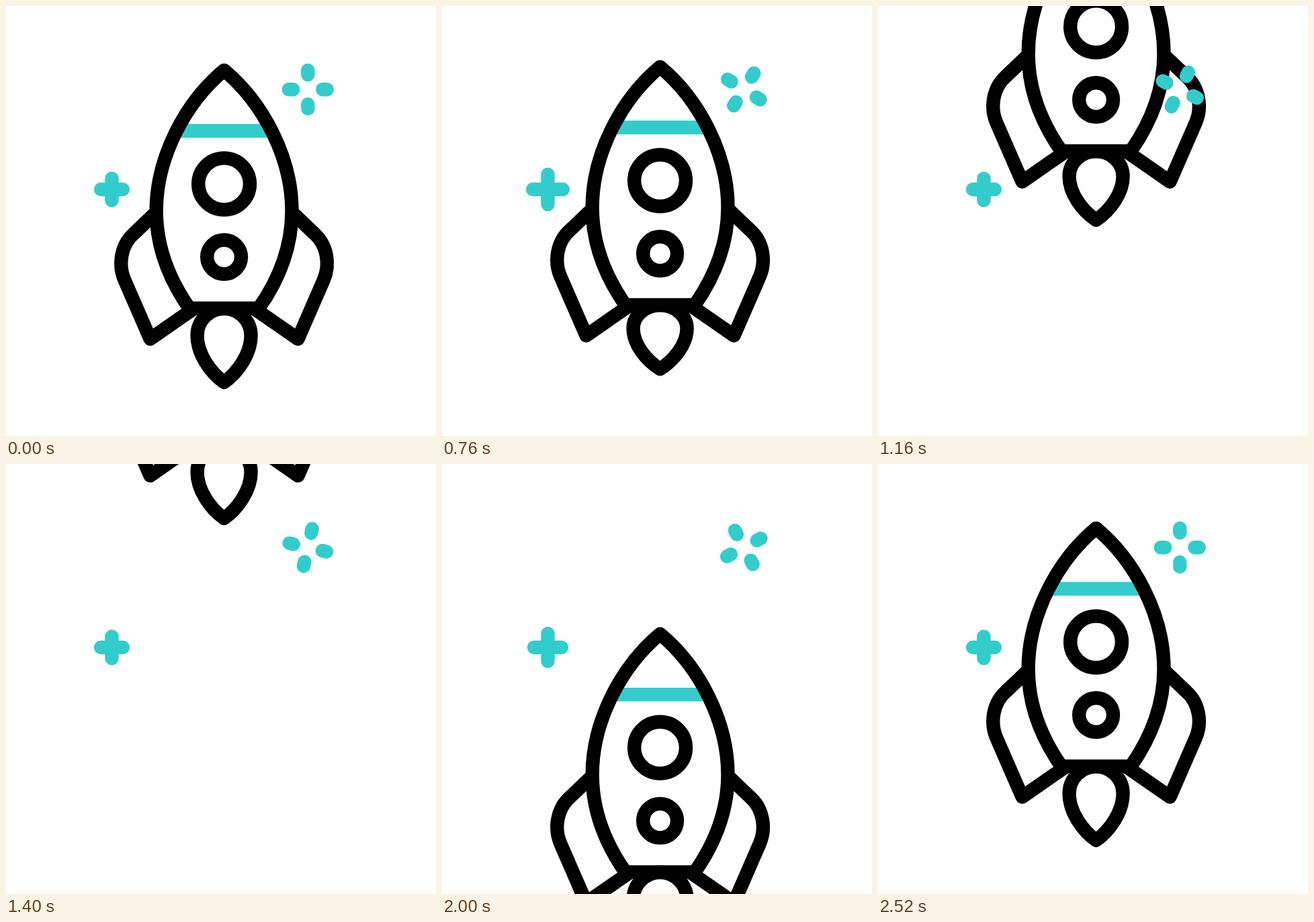
An HTML page for the animation above (2760 ms loop, 640 px wide and 640 px high).

```html
<!DOCTYPE html>
<html lang="en">
<head>
<meta charset="utf-8">
<title>Rocket launch</title>
<style>
  html, body { margin: 0; width: 100%; height: 100%; overflow: hidden; background: #fff; }
  svg { display: block; width: 100%; height: 100%; }
  .ink, .teal { fill: none; stroke-width: 20.4; stroke-linejoin: round; stroke-linecap: round; }
  .ink { stroke: #000; }
  .teal { stroke: #33cccc; }
</style>
</head>
<body>
<svg viewBox="0 0 640 640">
  <g id="rocket">
    <path class="teal" style="stroke-linecap:butt" d="M256 185.7H393"/>
    <g class="ink">
      <path d="M273 450C240 403 223.7 355 223.7 305C223.7 225 267 143.5 324.6 95.6C382.2 143.5 425.5 225 425.5 305C425.5 355 409.2 403 376.2 450Z"/>
      <path id="fin" d="M222 308.5L190 339C171 356 166.5 385 176.5 408L214.6 495.5L278 451.5"/>
      <use href="#fin" transform="matrix(-1 0 0 1 649.2 0)"/>
      <circle cx="324.6" cy="264.8" r="38.4"/>
      <circle cx="324.6" cy="373.6" r="25.4"/>
      <path id="flame"/>
    </g>
  </g>
  <path id="plus" class="teal"/>
  <path id="spark" class="teal" d="M0-28.5V-22M28.5 0H22M0 28.5V22M-28.5 0H-22"/>
</svg>
<script>
const LOOP = 2760, STEP = 40;
const el = id => document.getElementById(id);
const rocket = el('rocket'), flame = el('flame'), plus = el('plus'), spark = el('spark');

const span = (t, a, b) => Math.min(1, Math.max(0, (t - a) / (b - a)));
const smooth = p => p * p * (3 - 2 * p);
const pulse = (t, a, peak, b) => smooth(t < peak ? span(t, a, peak) : 1 - span(t, peak, b));

// Cubic easing with flat ends and handles at x1 and x2
function ease(x, x1, x2) {
  let lo = 0, hi = 1;
  for (let i = 0; i < 24; i++) {
    const s = (lo + hi) / 2, r = 1 - s;
    if (3 * x1 * s * r * r + 3 * x2 * s * s * r + s * s * s < x) lo = s; else hi = s;
  }
  return smooth(lo);
}

// Dip, lift off through the top, then glide in from below
function rocketY(t) {
  if (t < 580) return 21.5 * smooth(t / 580);
  if (t < 1580) return 21.5 - 255.5 * ((t - 580) / 580) ** 1.937;
  return 40 * (Math.max(0, 2440 - t) / 240) ** 2.26;
}

function flamePath(h) {
  const k = h / 110, y = v => 450.4 + v * k;
  return `M324.6 ${y(109.6)}C304 ${y(95)} 284.6 ${y(67)} 284.6 ${y(40)}` +
    `C284.6 ${y(18)} 302.5 ${y(0)} 324.6 ${y(0)}S364.6 ${y(18)} 364.6 ${y(40)}` +
    `C364.6 ${y(67)} 345.2 ${y(95)} 324.6 ${y(109.6)}Z`;
}

function draw(t) {
  rocket.setAttribute('transform', `translate(0 ${rocketY(t)})`);
  flame.setAttribute('d', flamePath(110 - 16 * pulse(t, 560, 800, 1500)));
  const arm = 16.4 + 6.3 * (pulse(t, 560, 790, 1120) + pulse(t, 1760, 2160, 2520));
  plus.setAttribute('d', `M${157.5 - arm} 273h${2 * arm}M157.5 ${273 - arm}v${2 * arm}`);
  const turn = 360 * ease(span(t, 210, 2530), 0.525, 0.465);
  spark.setAttribute('transform', `translate(449.3 124.2) rotate(${turn})`);
}

const start = performance.now();
function tick() {
  const t = (performance.now() - start) % LOOP;
  draw(Math.min(2520, Math.floor(t / STEP) * STEP));
  requestAnimationFrame(tick);
}
tick();
</script>
</body>
</html>
```
